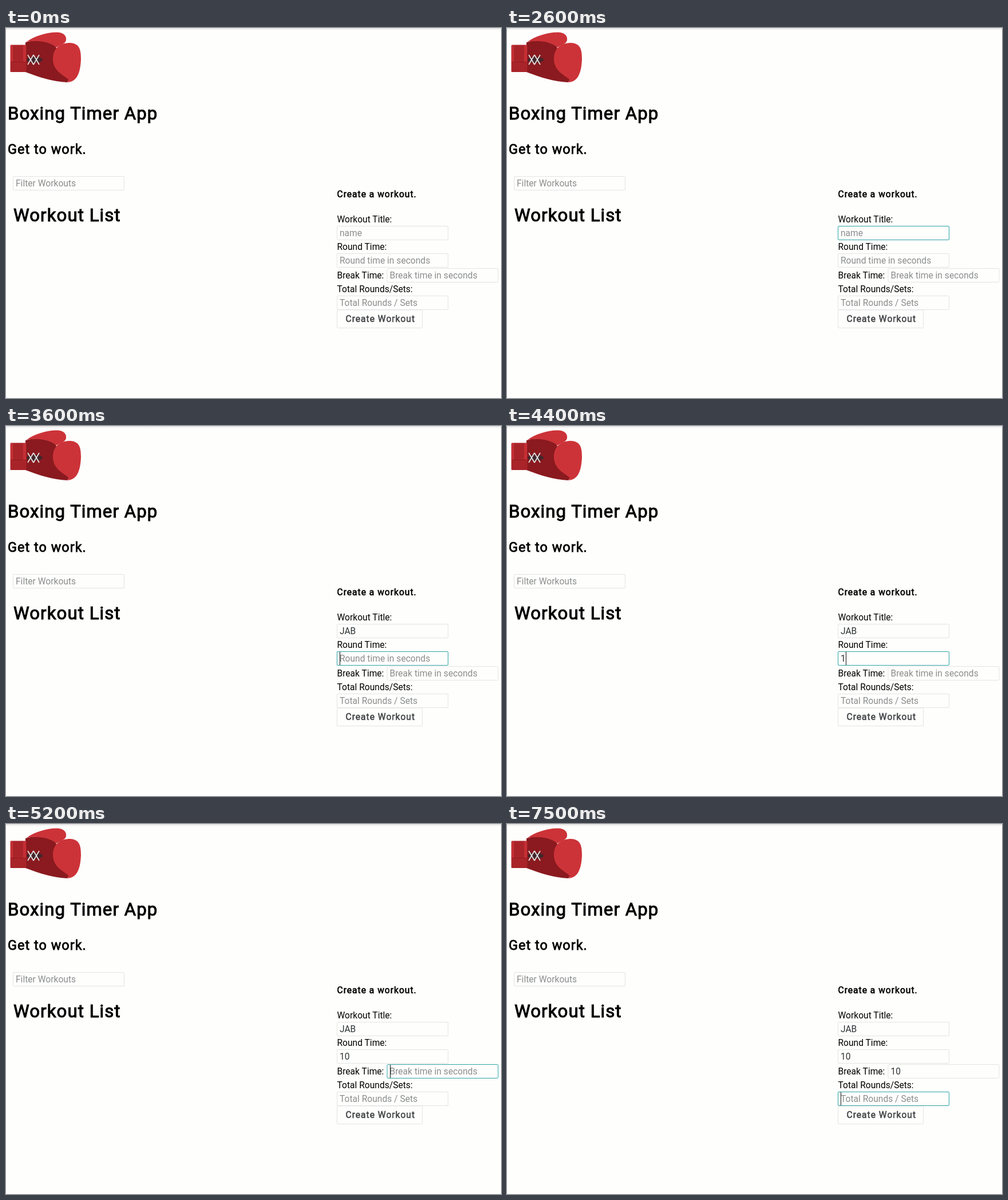
An HTML page for the animation above (8 s loop, 865 px wide and 647 px high).

```html
<!DOCTYPE html>
<html lang="en">
<head>
<meta charset="utf-8">
<title>Boxing Timer App</title>
<style>
  html, body { margin: 0; width: 100%; height: 100%; overflow: hidden; background: #fefefd; }
  svg { display: block; }
  text { font: 15.6px Roboto, sans-serif; white-space: pre; }
  .bold { letter-spacing: 1px; stroke: currentColor; stroke-width: .6; }
  .h1 { font-size: 31.2px; letter-spacing: 1.05px; stroke-width: 1; }
  .h2 { font-size: 23.4px; letter-spacing: 1.05px; stroke-width: .8; }
  .field { fill: #fefefd; stroke: #e4e4e4; }
  .field.focus { stroke: #2fa3a6; }
  .value { fill: #2e3436; }
  .hint { fill: #8b8d8d; }
  .shadow { filter: drop-shadow(0 2px 3px rgba(0, 0, 0, .4)); }
</style>
</head>
<body>
<svg id="stage" width="865" height="647" viewBox="0 0 865 647">
  <defs>
    <linearGradient id="edge" x2="0" y2="1">
      <stop stop-color="#d9d9d9"/><stop offset=".4" stop-color="#f2f2f2"/><stop offset="1" stop-color="#fefefd"/>
    </linearGradient>
    <linearGradient id="fade" x2="0" y2="1">
      <stop stop-opacity="0"/><stop offset="1" stop-opacity=".1"/>
    </linearGradient>
  </defs>
  <rect width="865" height="5" fill="url(#edge)"/>
  <g id="glove">
    <path d="M34 25 Q60 17 86 31 L112 88 L107 95 C82 94 58 86 34 77Z" fill="#8a1a1f"/>
    <path d="M36 24 C50 14 72 7 90 7.5 C102 8 106 15 105 21 C104 28 96 29 88 34 C76 23 55 21 36 24Z" fill="#cc3338"/>
    <path d="M82 54 C82 34 96 26 112 26 C128 27 131 37 131 54 C130 81 123 94 107 95 Q111 92 108 89 C98 81 82 74 82 54Z" fill="#cc3338"/>
    <rect x="7.5" y="29.5" width="28" height="47.5" rx="1.5" fill="#a92429"/>
    <path d="M8 30H12V59H8ZM30 30H35V59H30Z" fill="#c52f34"/>
    <path d="M8 59.5H35" stroke="#7d171b" stroke-dasharray="1.5 1"/>
    <ellipse cx="50" cy="55.5" rx="14" ry="5" fill="#43262b"/>
    <path d="M38 47L48 64M48 47L38 64M48 47L58 64M58 47L48 64" stroke="#e6e6e6" stroke-width="1.7"/>
  </g>
</svg>
<script>
const LOOP = 8000;
const stage = document.getElementById('stage');

function add(tag, attrs, parent = stage) {
  const node = document.createElementNS('http://www.w3.org/2000/svg', tag);
  for (const key in attrs) node.setAttribute(key, attrs[key]);
  return parent.appendChild(node);
}

function write(x, y, content, cls = '', parent = stage) {
  const node = add('text', { x, y, class: cls }, parent);
  node.textContent = content;
  return node;
}

const box = (x, y, width, height) => add('rect', { x, y, width, height, rx: 1.5, class: 'field' });

function makeField(x, y, hint) {
  const frame = box(x, y, 194, 24);
  const text = write(x + 4.5, y + 17.5, hint, 'hint');
  return { x, y, hint, frame, text };
}

write(3, 160, 'Boxing Timer App', 'bold h1');
write(3, 219.5, 'Get to work.', 'bold h2');
write(13, 338, 'Workout List', 'bold h1');
write(578.5, 296, 'Create a workout.', 'bold');
write(578.5, 340, 'Workout Title:');
write(578.5, 388, 'Round Time:');
write(578.5, 437.5, 'Break Time:');
write(578.5, 461.5, 'Total Rounds/Sets:');
makeField(12.5, 259.5, 'Filter Workouts');
box(578.5, 493, 149, 31.5);
add('g', { fill: '#444648', color: '#444648' })
  .append(write(593.5, 513.5, 'Create Workout', 'bold'));

const fields = [
  makeField(578.5, 346.5, 'name'),
  makeField(578.5, 394.5, 'Round time in seconds'),
  makeField(666, 420.5, 'Break time in seconds'),
  makeField(578.5, 468.5, 'Total Rounds / Sets')
];
const menu = add('g', {});
const caret = add('rect', { width: 1, height: 23, fill: '#111' });

const TITLE = 0, ROUND = 1, BREAK = 2, TOTAL = 3;
// Each step: start time, focused field, typed values, suggestions, caret hidden
const steps = [
  { at: 0, focus: -1, values: [] },
  { at: 1500, focus: TITLE, values: [] },
  { at: 2600, focus: TITLE, values: [], blink: true },
  { at: 2800, focus: TITLE, values: ['JA'], items: ['JAB', 'jab', 'JAB2'] },
  { at: 3000, focus: TITLE, values: ['JA'], items: ['JAB', 'JAB2', 'jab'] },
  { at: 3200, focus: TITLE, values: ['JAB'], items: ['JAB', 'JAB2', 'jab'] },
  { at: 3600, focus: ROUND, values: ['JAB'] },
  { at: 4400, focus: ROUND, values: ['JAB', '1'] },
  { at: 4500, focus: ROUND, values: ['JAB', '1'], items: ['10', '15'] },
  { at: 4600, focus: ROUND, values: ['JAB', '10'], items: ['10'] },
  { at: 4800, focus: ROUND, values: ['JAB', '10'], items: ['10'], blink: true },
  { at: 5200, focus: BREAK, values: ['JAB', '10'] },
  { at: 6400, focus: BREAK, values: ['JAB', '10'], blink: true },
  { at: 7000, focus: BREAK, values: ['JAB', '10', '1'], items: ['10', '15'] },
  { at: 7100, focus: BREAK, values: ['JAB', '10', '10'], items: ['10'] },
  { at: 7400, focus: BREAK, values: ['JAB', '10', '10'] },
  { at: 7500, focus: TOTAL, values: ['JAB', '10', '10'] }
];

function showMenu(field, items, flat) {
  menu.replaceChildren();
  if (!items) return;
  const x = field.x - .5, y = field.y + 25;
  const panel = { x, y, width: 193, height: items.length * 20.2 + 3.5, fill: '#fefefd' };
  if (flat) {
    add('rect', { x: x + 1, y: y - 17, width: 193, height: 16, fill: 'url(#fade)' }, menu);
    panel.stroke = '#e4e4e4';
  } else {
    panel.class = 'shadow';
  }
  add('rect', panel, menu);
  items.forEach((item, i) => write(field.x + 5.5, field.y + 42.5 + i * 20.3, item, 'value', menu));
}

function show({ focus, values, items, blink }) {
  fields.forEach((field, i) => {
    field.frame.classList.toggle('focus', i === focus);
    field.text.textContent = values[i] || field.hint;
    field.text.setAttribute('class', values[i] ? 'value' : 'hint');
  });
  const field = fields[focus];
  showMenu(field, items, focus === BREAK);
  caret.style.display = field && !blink ? '' : 'none';
  if (!field) return;
  const width = values[focus] ? field.text.getComputedTextLength() : 0;
  caret.setAttribute('x', Math.round(field.x + 4.5 + width));
  caret.setAttribute('y', Math.ceil(field.y));
}

let current;
function draw(now) {
  const time = now % LOOP;
  const step = steps.findLast(s => s.at <= time);
  if (step !== current) show(current = step);
}

const start = performance.now();
function tick() {
  draw(performance.now() - start);
  requestAnimationFrame(tick);
}
tick();
</script>
</body>
</html>
```
